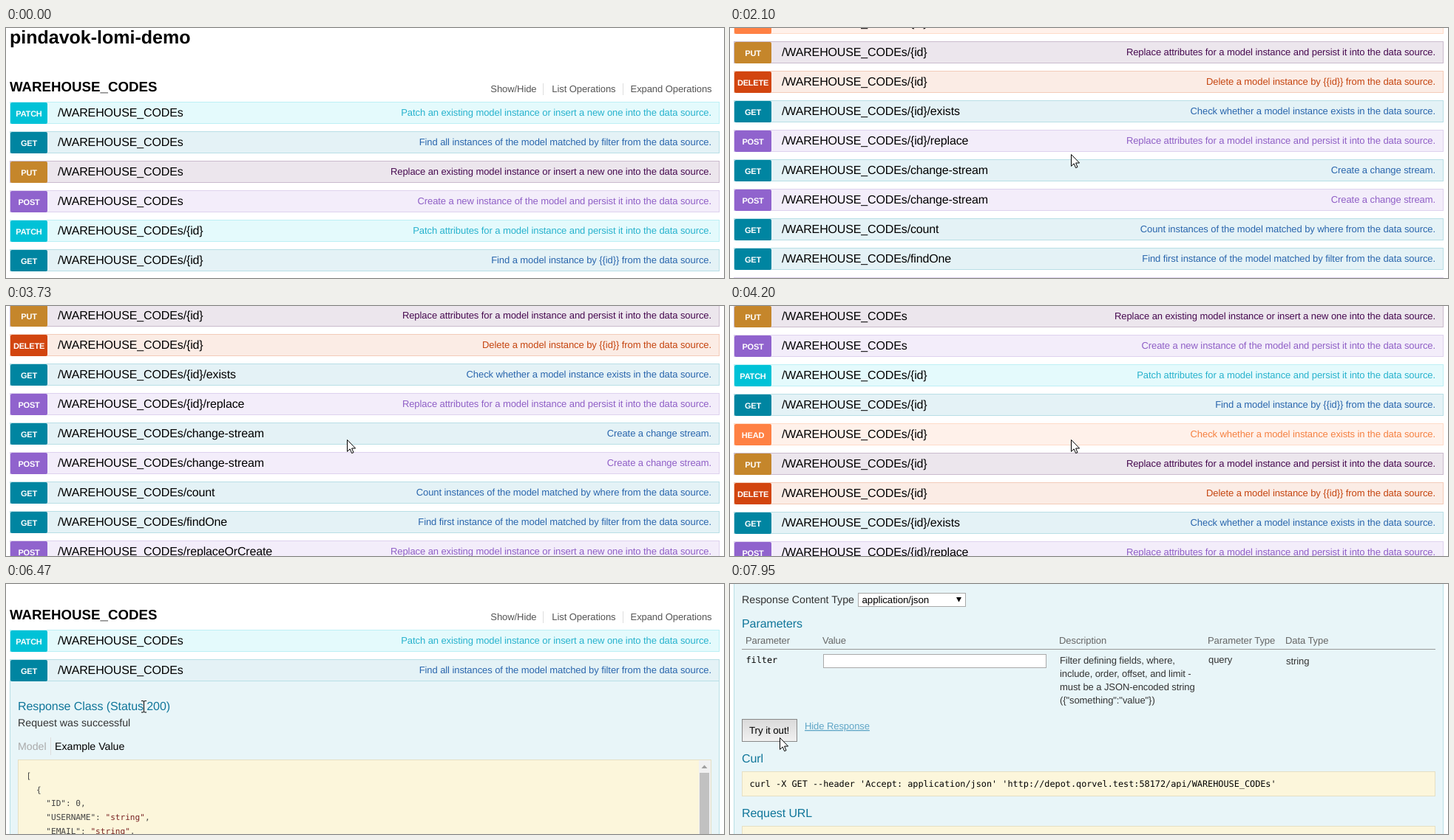
An HTML page for the animation above (8 s loop, 971 by 339 pixels).

```html
<!DOCTYPE html>
<html lang="en">
<head>
<meta charset="utf-8">
<title>API explorer</title>
<style>
html, body { margin: 0; width: 100%; height: 100%; overflow: hidden; background: #fff; }
svg { display: block; width: 971px; height: 339px; }
text { font-family: "Liberation Sans", Arial, sans-serif; font-size: 13px; letter-spacing: -.08px; fill: #333; text-rendering: geometricPrecision; }
.title { font-size: 25px; letter-spacing: 0; font-weight: bold; fill: #000; }
.group { font-size: 18.7px; letter-spacing: 0; font-weight: bold; fill: #000; }
.badge { font-size: 11px; letter-spacing: -.2px; font-weight: bold; fill: #fff; text-anchor: middle; }
.path { font-size: 16px; letter-spacing: -.14px; fill: #000; }
.right { text-anchor: end; }
.menu { fill: #555; }
.head { font-size: 16px; fill: #10769a; }
.body { font-size: 14.2px; letter-spacing: 0; }
.off { fill: #aaa; }
.ui { font-size: 13.33px; fill: #000; }
.th { fill: #666; }
.link { fill: #5fa5c6; text-decoration: underline; }
.mono { font-family: "DejaVu Sans Mono", "Liberation Mono", monospace; font-size: 11.83px; letter-spacing: 0; fill: #000; }
.code { font-size: 11.1px; fill: #444; }
.str { fill: #7a2424; }
</style>
</head>
<body>
<svg id="stage" viewBox="0 0 971 339">
  <defs>
    <clipPath id="panelClip"><rect id="clipBox" x="0" y="170" width="971" height="0"/></clipPath>
    <clipPath id="codeClip"><rect x="17" y="277" width="920" height="398"/></clipPath>
    <linearGradient id="face" x2="0" y2="1"><stop id="faceTop"/><stop id="faceEnd" offset="1"/></linearGradient>
  </defs>
  <g id="page">
    <g id="top"></g>
    <g id="panel" clip-path="url(#panelClip)"></g>
    <g id="below"></g>
  </g>
  <g id="cursor" stroke="#000" fill="#fff" stroke-linejoin="round">
    <path id="arrow" d="M.5 .5V16.4L4.2 12.9 6.6 18.6 9 17.6 6.6 12H11.6Z"/>
    <path id="hand" d="M-1.5 13V2Q-1.5 .5 0 .5T1.5 2V7.2Q1.8 6 3.2 6.2T4.6 7.8Q5 6.8 6.2 7T7.6 8.6Q8 7.8 9.2 8.1T10.5 10V15Q10.5 17.5 8.5 19.5V22.5H0V20Q-2 17.5-4.6 13.8-5.6 12-4.4 11.1-3 10.4-1.5 13ZM1.5 7.2V11M4.6 8V11M7.6 8.8V11"/>
    <path id="beam" fill="none" d="M-3-7.5H-1Q.5-7.5.5-6 .5-7.5 2-7.5H4M.5-6V6.5M-3 8H-1Q.5 8 .5 6.5 .5 8 2 8H4"/>
  </g>
</svg>
<script>
const $ = id => document.getElementById(id);
const LOOP = 8000, OPEN = 1500, LOW = 700;
const BASE = '/WAREHOUSE_CODEs';

// badge, row fill, row border, description
const METHODS = {
  PATCH:  ['#00c2d7', '#e4fafc', '#bdf0f5', '#27b2cd'],
  GET:    ['#0085a1', '#e4f2f6', '#b9dfe6', '#2a66ad'],
  PUT:    ['#c5862b', '#ece6ed', '#cabbcd', '#470a50'],
  POST:   ['#9063cd', '#f3edfa', '#ded2ee', '#8f5fc6'],
  HEAD:   ['#ff8144', '#fff1ea', '#ffdcc9', '#f58142'],
  DELETE: ['#d2450f', '#fbece5', '#f3cbb9', '#c5440f']
};
const FROM = ' from the data source.', SAVE = ' model instance and persist it into the data source.';
const UPSERT = ' an existing model instance or insert a new one into the data source';
const EXISTS = 'Check whether a model instance exists in the data source.';
const STREAM = 'Create a change stream.';
const ROWS = [
  ['PATCH', '', 'Patch' + UPSERT + '.'],
  ['GET', '', 'Find all instances of the model matched by filter' + FROM],
  ['PUT', '', 'Replace' + UPSERT + '.'],
  ['POST', '', 'Create a new instance of the model and persist it into the data source.'],
  ['PATCH', '/{id}', 'Patch attributes for a' + SAVE],
  ['GET', '/{id}', 'Find a model instance by {{id}}' + FROM],
  ['HEAD', '/{id}', EXISTS],
  ['PUT', '/{id}', 'Replace attributes for a' + SAVE],
  ['DELETE', '/{id}', 'Delete a model instance by {{id}}' + FROM],
  ['GET', '/{id}/exists', EXISTS],
  ['POST', '/{id}/replace', 'Replace attributes for a' + SAVE],
  ['GET', '/change-stream', STREAM],
  ['POST', '/change-stream', STREAM],
  ['GET', '/count', 'Count instances of the model matched by where' + FROM],
  ['GET', '/findOne', 'Find first instance of the model matched by filter' + FROM],
  ['POST', '/replaceOrCreate', 'Replace' + UPSERT + '.'],
  ['POST', '/update', 'Update instances of the model matched by {{where}}' + FROM],
  ['POST', '/upsertWithWhere', 'Update' + UPSERT + ' based on the where criteria.']
];

const text = (x, y, s, cls = '', extra = '') => `<text x="${x}" y="${y}" class="${cls}" ${extra}>${s}</text>`;
const box = (x, y, w, h, fill, line, extra = '') =>
  `<rect x="${x + .5}" y="${y + .5}" width="${w - 1}" height="${h - 1}" fill="${fill}" stroke="${line}" ${extra}/>`;
const fill = (x, y, w, h, color, extra = '') =>
  `<rect x="${x}" y="${y}" width="${w}" height="${h}" fill="${color}" ${extra}/>`;

function row([method, path, note], i) {
  const y = 100 + 40 * i, [badge, bg, line, ink] = METHODS[method];
  const last = i === ROWS.length - 1;
  return box(5, y, 960, last ? 52 : 30, bg, line) +
    fill(6, y + 1, 50, 29, badge, 'rx="2"') +
    text(31, y + 20, method, 'badge') +
    text(70, y + 20, BASE + path, 'path') +
    text(954, y + (last ? 47 : 19), note, 'right', `style="fill:${ink}"`);
}

function snippet() {
  const names = ['USERNAME', 'EMAIL', 'PASSWORD', 'FIRSTNAME', 'LASTNAME', 'PHONE', 'ADDRESS', 'CITY', 'STATE',
    'ZIP', 'COUNTRY', 'COMPANY', 'ROLE', 'STATUS', 'CREATED', 'UPDATED', 'NOTES', 'LOCALE'];
  const str = s => `<tspan class="str">"${s}"</tspan>`;
  const lines = [[0, '['], [1, '{'], [2, '"ID": 0,'], ...names.map(n => [2, `"${n}": ${str('string')},`])];
  return box(16, 276, 938, 400, '#fcf6db', '#e5dfc4') +
    '<g clip-path="url(#codeClip)">' +
    lines.map(([depth, s], i) => text(27.5 + 13.4 * depth, Math.round(302 + 18.7 * i), s, 'mono code')).join('') + '</g>' +
    fill(937, 277, 16, 398, '#f1f1f1') + fill(938, 294, 13, 210, '#c1c1c1') +
    '<path d="M940.5 288h8l-4-4.5zM940.5 664h8l-4 4.5z" fill="#a0a0a0"/>';
}

function lower() {
  const heads = [[21, 'Parameter'], [125, 'Value'], [445, 'Description'], [646, 'Parameter Type'], [751, 'Data Type']];
  const about = ['Filter defining fields, where,', 'include, order, offset, and limit -',
    'must be a JSON-encoded string', '({"something":"value"})'];
  const url = 'http://depot.qorvel.test:58172/api' + BASE;
  return `<g transform="translate(0 ${LOW})">` +
    text(16, 26, 'Response Content Type', 'body') +
    box(173, 12, 146, 19, '#fff', '#a9a9a9') + text(178.5, 26, 'application/json', 'ui') +
    '<path d="M306 18h7l-3.5 6.5z"/>' +
    text(16, 59, 'Parameters', 'head') +
    heads.map(([x, s]) => text(x, 81, s, 'th')).join('') +
    fill(16, 88, 938, 1, '#999') +
    text(21.5, 107, 'filter', 'mono') + box(126, 95, 302, 19, '#fff', '#a9a9a9') +
    about.map((s, i) => text(446, 108 + 18 * i, s)).join('') +
    text(647, 107, 'query') + text(752, 109, 'string') +
    box(16, 183, 75, 31, 'url(#face)', '#bbb', 'id="button"') + text(26, 203, 'Try it out!', 'ui') +
    text(101, 197, 'Hide Response', 'link') +
    text(16, 242, 'Curl', 'head') + box(16, 254, 938, 34, '#fcf6db', '#e5dfc4') +
    text(26.5, 275, `curl -X GET --header 'Accept: application/json' '${url}'`, 'mono') +
    text(16, 316, 'Request URL', 'head') + box(16, 328, 938, 34, '#fcf6db', '#e5dfc4') +
    text(26.5, 349, url, 'mono') + '</g>';
}

$('top').innerHTML =
  text(5, 21, 'pindavok-lomi-demo', 'title') + text(5, 86, 'WAREHOUSE_CODES', 'group') +
  text(717.5, 87, 'Show/Hide', 'menu right') + text(824.5, 87, 'List Operations', 'menu right') +
  text(954.5, 87, 'Expand Operations', 'menu right') +
  fill(726, 75, 1, 16, '#ddd') + fill(834, 75, 1, 16, '#ddd') +
  ROWS.slice(0, 2).map(row).join('') + fill(70, 161, 169, 1, '#000', 'id="underline"');
$('panel').innerHTML =
  box(5, 169, 960, OPEN, '#e8f5f8', '#b9dfe6') +
  text(16, 209, 'Response Class (Status 200)', 'head') +
  text(16, 231, 'Request was successful', 'body') +
  text(16, 263, 'Model', 'body off') + fill(60, 246, 1, 24, '#ddd') +
  text(66, 263, 'Example Value', 'body', 'style="fill:#000"') +
  snippet() + lower();
$('below').innerHTML = ROWS.slice(2).map((r, i) => row(r, i + 2)).join('');

// first change, last change, number of changes
const BURSTS = [[220, 830, 9], [1080, 1840, 11], [1930, 2240, 5], [2400, 2630, 4], [2780, 2950, 3], [3500, 4280, 11],
  [4350, 4580, 4], [4980, 5450, 7], [6000, 6800, 11], [6860, 7550, 10], [7670, 7720, 2], [7950, 7950, 1]];
// start, end, scroll position reached
const SCROLLS = [[1010, 1460, 200], [1470, 1840, 300], [1870, 2240, 400], [2340, 2630, 500],
  [3440, 3670, 400], [3670, 3910, 300], [3910, 4160, 200], [4161, 4310, 100], [4310, 4580, 0],
  [6400, 6760, 300], [6790, 7150, 500], [7160, 7540, 700]];
// time, x, y
const MOVES = [[220, 830, 245], [448, 650, 180], [640, 510, 141], [830, 462, 156], [1840, 462, 156], [2240, 461, 181],
  [2700, 461, 181], [2780, 459, 179], [2950, 461, 181], [4920, 461, 181], [5450, 193, 155], [6080, 193, 155],
  [6320, 186, 166], [6860, 186, 166], [7550, 70, 219], [7670, 68, 213], [7720, 67, 208]];
const BUTTON = { idle: ['#f6f6f6', '#dedede', '#bbb'], hover: ['#fafafa', '#e4e4e4', '#999'], down: ['#dadada', '#f1f1f1', '#888'] };

const smooth = p => p * p * (3 - 2 * p);
const part = (t, a, b) => Math.min(1, Math.max(0, (t - a) / (b - a)));

// The screen refreshes only at the steps of each burst.
function snap(t) {
  let at = 0;
  for (const [a, b, n] of BURSTS) {
    if (t < a) break;
    const step = n > 1 ? (b - a) / (n - 1) : 1;
    at = a + step * Math.min(n - 1, Math.floor((t - a) / step + .15));
  }
  return at;
}

function scrollAt(t) {
  let y = 0;
  for (const [a, b, to] of SCROLLS) y += (to - y) * smooth(part(t, a, b));
  return Math.round(y);
}

function pointerAt(t) {
  let [, x, y] = MOVES[0];
  for (let i = 1; i < MOVES.length; i++) {
    const [a] = MOVES[i - 1], [b, nx, ny] = MOVES[i], p = part(t, a, b);
    x += (nx - x) * p;
    y += (ny - y) * p;
  }
  return [Math.round(x), Math.round(y)];
}

const show = (id, on) => $(id).setAttribute('display', on ? 'inline' : 'none');

function draw(time) {
  const t = snap(time);
  const open = Math.round(OPEN * (.5 - Math.cos(Math.PI * part(t, 5960, 6360)) / 2));
  $('page').setAttribute('transform', `translate(0 ${-scrollAt(t)})`);
  $('clipBox').setAttribute('height', open);
  $('below').setAttribute('transform', `translate(0 ${open})`);
  show('panel', open > 0);

  const kind = t > 5360 && t < 6200 ? 'hand' : t >= 6200 && t < 7200 ? 'beam' : 'arrow';
  for (const id of ['arrow', 'hand', 'beam']) show(id, id === kind);
  show('underline', kind === 'hand');
  show('cursor', t >= 220);
  $('cursor').setAttribute('transform', `translate(${pointerAt(t)})`);

  const [a, b, line] = BUTTON[t >= 7950 ? 'down' : t >= 7670 ? 'hover' : 'idle'];
  $('faceTop').setAttribute('stop-color', a);
  $('faceEnd').setAttribute('stop-color', b);
  $('button').setAttribute('stroke', line);
}

const start = performance.now();
function tick() {
  draw((performance.now() - start) % LOOP);
  requestAnimationFrame(tick);
}
tick();
</script>
</body>
</html>
```
